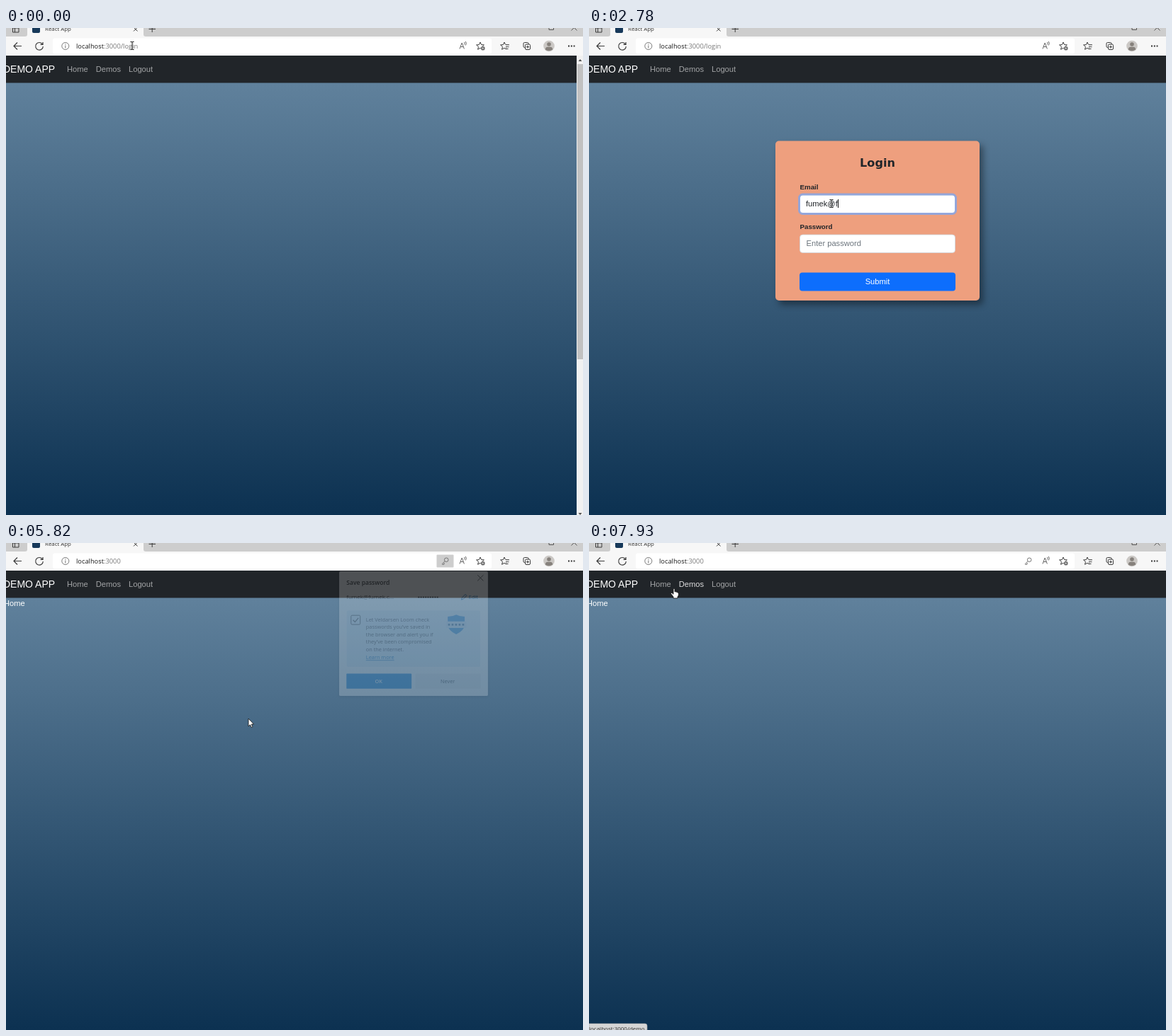
Recreate the animation shown at these times as an HTML page. Size 814 by 688 pixels, loop 8000 ms.

```html
<!DOCTYPE html>
<html lang="en">
<head>
<meta charset="utf-8">
<title>Login demo</title>
<style>
html, body { margin: 0; width: 100%; height: 100%; overflow: hidden; }
svg { display: block; width: 814px; height: 688px; }
text { font: 11.15px "Liberation Sans", Arial, sans-serif; }
.ui text { font: 7.7px "Open Sans", "Noto Sans", sans-serif; fill: #333; }
.ui .url { font-size: 9.3px; fill: #767676; }
.ui .bold { font-size: 8.95px; font-weight: 600; fill: #1b1b1b; }
.url .host { fill: #1a1a1a; }
.mid { text-anchor: middle; }
.icon { fill: none; stroke: #3b3b3b; stroke-width: 1; }
.link { fill: rgba(255, 255, 255, .58); }
.white { fill: #fff; }
.title { font: bold 16.1px "DejaVu Sans", sans-serif; fill: #212529; }
.label { font-weight: bold; font-size: 9.75px; fill: #212529; }
.hint { fill: #6c757d; }
.typed { fill: #212529; }
.field { fill: #fff; stroke: #ced4da; stroke-width: .8; }
.ring { fill: none; stroke: #86a5e6; stroke-width: 3; stroke-opacity: .85; }
.card { filter: drop-shadow(5px 6px 5px rgba(0, 0, 0, .4)); }
.popup-box { filter: drop-shadow(0 1px 2px rgba(0, 0, 0, .3)); }

#pointer, #popup, .ring { animation: 8s linear infinite; }
#pointer { animation-name: move; }
#popup { animation-name: popup; transform-origin: 493px 62px; }
#emailRing { animation-name: email-focus; }
#passRing { animation-name: pass-focus; }

@keyframes move {
  0%, .875% { transform: translate(178px, 25px); }
  3.375% { transform: translate(186px, 31px); }
  6.625% { transform: translate(206px, 58px); }
  9.125% { transform: translate(238.5px, 102px); }
  9.875% { transform: translate(272px, 150px); }
  10.75% { transform: translate(314px, 211px); }
  11.5% { transform: translate(326px, 228px); }
  13.125% { transform: translate(338px, 243px); }
  14.875%, 80.25% { transform: translate(342px, 248px); }
  83.5% { transform: translate(450px, 235px); }
  86% { transform: translate(600px, 202px); }
  86.875%, 88.5% { transform: translate(617.5px, 197px); }
  89.25% { transform: translate(560px, 180px); }
  90.875% { transform: translate(411px, 140px); }
  93.375% { transform: translate(260px, 95px); }
  95.875% { transform: translate(165px, 72px); }
  98.25% { transform: translate(124px, 65px); }
  99.125%, 100% { transform: translate(120px, 64px); }
}
@keyframes popup {
  0%, 71.875% { opacity: 0; transform: scale(.945); }
  72.75% { opacity: .2; transform: scale(.957); }
  75.25%, 87.625% { opacity: 1; transform: scale(.978); }
  88.5% { opacity: .47; transform: scale(1); }
  90%, 100% { opacity: 0; transform: scale(1); }
}
@keyframes email-focus {
  0%, 16.5% { opacity: 0; }
  18.375%, 44.625% { opacity: 1; }
  46.5%, 100% { opacity: 0; }
}
@keyframes pass-focus {
  0%, 44.625% { opacity: 0; }
  46.5%, 100% { opacity: 1; }
}
</style>
</head>
<body>
<svg viewBox="0 0 814 688">
  <defs>
    <linearGradient id="sky" x2="0" y2="1">
      <stop stop-color="#60819c"/><stop offset="1" stop-color="#0c3151"/>
    </linearGradient>
    <path id="star" d="M0-5.5 1.6-1.9 5.4-1.6 2.5 1 3.4 4.8 0 2.8-3.4 4.8-2.5 1-5.4-1.6-1.6-1.9Z"/>
  </defs>

  <!-- page -->
  <rect y="77" width="814" height="611" fill="url(#sky)"/>
  <rect y="39" width="814" height="38.5" fill="#212529"/>
  <text class="white" x="-4" y="63" style="font-size:14px">DEMO APP</text>
  <text class="link" x="86" y="62">Home</text>
  <text class="link" x="126.7" y="62" data-on="0-7800">Demos</text>
  <text x="126.7" y="62" fill="#dcdcdd" data-on="7800-8000">Demos</text>
  <text class="link" x="173" y="62">Logout</text>

  <!-- scrollbar -->
  <g data-on="0-70">
    <rect x="805" y="39" width="9" height="649" fill="#f1f1f1"/>
    <rect x="806" y="51" width="8" height="417" fill="#c1c1c1"/>
    <path d="M807.5 47l2.5-3 2.5 3zM807.5 685l2.5 3 2.5-3z" fill="#505050"/>
  </g>

  <!-- login form -->
  <g data-on="70-5550">
    <rect class="card" x="263" y="159.500" width="288" height="225.500" rx="5" fill="#ee9f7e"/>
    <text class="title mid" x="407" y="196">Login</text>
    <text class="label" x="297.500" y="228">Email</text>
    <rect class="field" x="297.500" y="236" width="219" height="25.500" rx="4"/>
    <rect class="ring" id="emailRing" x="296.500" y="235" width="221" height="27.500" rx="5"/>
    <text class="hint" x="306.500" y="252" data-on="0-1990">Enter email</text>
    <text class="typed" id="email" x="306" y="252"></text>
    <text class="label" x="297.500" y="284.300">Password</text>
    <rect class="field" x="297.500" y="292" width="219" height="25.500" rx="4"/>
    <rect class="ring" id="passRing" x="296.500" y="291" width="221" height="27.500" rx="5"/>
    <text class="hint" x="306.500" y="308" data-on="0-3770">Enter password</text>
    <text class="typed" id="pass" x="306" y="308"></text>
    <g class="icon" stroke-width="1.2" data-on="3770-5550">
      <path d="M491.800 307.500C493 303 496 301 498.800 301S504.500 303 505.700 307.500" stroke="#222"/>
      <circle cx="498.800" cy="307" r="2.800" stroke="#222"/>
    </g>
    <rect id="caret" width="1" height="12" fill="#111"/>
    <rect x="297" y="345.500" width="220" height="26" rx="4" fill="#0d6efd"/>
    <text class="white mid" x="407" y="362">Submit</text>
  </g>

  <text class="white" x="-3" y="89" data-on="5550-8000">Home</text>

  <!-- browser frame -->
  <g class="ui">
    <rect width="814" height="13" fill="#cdcdcd"/>
    <path d="M0 12H27Q30 12 30 9V0H194V9Q194 12 197 12H814V39H0Z" fill="#f7f7f7"/>
    <rect x="66" y="14.500" width="619" height="22" rx="3" fill="#fff"/>
    <rect x="37" y="-4" width="11" height="11" rx="2" fill="#17395a"/>
    <text x="55" y="4.300" style="font-size:7.9px">React App</text>
    <g class="icon">
      <path d="M9.500-2V6H18V-2M12.500-2V6M9.500 0H18" />
      <path d="M180-1l5.500 5.500M185.500-1L180 4.500M201.500 1.500h9.500M206.200-3V6"/>
      <path d="M766-1V2.500h6.500V-1M797.500 3.500l4-4 4 4" stroke="#555"/>
      <path d="M22 25.500H11M16 20.500l-5 5 5 5" stroke-width="1.200"/>
      <path d="M51.500 23A5.300 5.300 0 1 0 52.300 26M52 20v3.400h-3.400" stroke-width="1.200"/>
      <g stroke="#777">
        <circle cx="83.800" cy="25.500" r="5"/><path d="M83.800 24.500v4M83.800 22.300v1.200"/>
      </g>
    </g>
    <text class="url" x="99" y="29" data-on="0-5550"><tspan class="host">localhost</tspan>:3000/login</text>
    <text class="url" x="99" y="29" data-on="5550-8000"><tspan class="host">localhost</tspan>:3000</text>

    <rect x="607.500" y="16.500" width="24" height="18" rx="1" fill="#cdcdcd" data-on="5690-7270"/>
    <g class="icon" stroke="#666">
      <g data-on="3770-8000" stroke="#777">
        <circle cx="621.200" cy="23.800" r="2.800"/><path d="M619 25.800L615.500 29.300V30.300H617.800V28.800H619"/>
      </g>
      <path d="M640 29.500l3.200-8.500 3.200 8.500M641.200 26.500h4M646.500 20q1.500 1.500 0 3.500M648.300 19q2.200 2.500 0 5.500" stroke="#666"/>
      <use href="#star" x="669" y="25.500"/>
      <circle cx="672.800" cy="28.700" r="3" fill="#555" stroke="#fff" stroke-width=".5"/>
      <path d="M671.200 28.700h3.200M672.800 27.100v3.200" stroke="#fff" stroke-width=".7"/>
      <use href="#star" x="703" y="25.500"/>
      <path d="M704 25h6M705.500 27.700h4.500M705.500 30.300h3.500" stroke="#f7f7f7" stroke-width="3"/>
      <path d="M705 23.800h5M705 26.700h4.500M705 29.500h3.500"/>
      <rect x="730" y="20.500" width="7" height="7" rx="1.500"/>
      <rect x="732.500" y="23" width="7" height="7.500" rx="1.500" fill="#f7f7f7"/>
      <path d="M734 26.700h4M736 24.700v4"/>
    </g>
    <circle cx="766" cy="25.500" r="7.800" fill="#cbc8c5"/>
    <circle cx="766" cy="23" r="2.800" fill="#86817c"/>
    <path d="M760.800 30.500Q761 26.800 764 26.800h4Q771 26.800 771.200 30.500Q766 34 760.800 30.500Z" fill="#86817c"/>
    <path d="M793 25.500h9.500" stroke="#333" stroke-width="2" stroke-dasharray="2 1.800"/>

    <g data-on="7800-8000">
      <path d="M0 679H79Q82 679 82 682V688H0Z" fill="#d6d6d6" stroke="#aaa" stroke-width=".6"/>
      <text x="0" y="688.500" style="font-size:8px">localhost:3000/demo</text>
    </g>

    <!-- password prompt -->
    <g id="popup">
      <rect class="popup-box" x="469" y="39" width="219.300" height="184" rx="2" fill="#fff"/>
      <text class="bold" x="479.700" y="59">Save password</text>
      <path class="icon" d="M673 44.500l8.500 8.500M681.500 44.500L673 53"/>
      <text x="479.700" y="80" style="font-size:8.35px">fumek@fumek.c...</text>
      <path d="M585.300 77.300h30" stroke="#222" stroke-width="2" stroke-dasharray="2 1.450"/>
      <path class="icon" d="M649 81l1-3 5-5 2 2-5 5Z" style="stroke:#0067b8"/>
      <text x="660" y="80" style="fill:#0067b8">Edit</text>
      <rect x="480" y="97" width="197" height="83" rx="2" fill="#e3eefa"/>
      <rect class="icon" x="486.500" y="104" width="13.500" height="13.500" rx="1.500"/>
      <path class="icon" d="M489.500 110.800l2.800 3 5-6" style="stroke-width:1.300"/>
      <text x="508.500" y="113">Let Veldarsen Loom check</text>
      <text x="508.500" y="124">passwords you’ve saved in</text>
      <text x="508.500" y="135">the browser and alert you if</text>
      <text x="508.500" y="146">they’ve been compromised</text>
      <text x="508.500" y="157">on the internet.</text>
      <text x="508.500" y="169" style="fill:#0067b8;text-decoration:underline">Learn more</text>
      <path d="M629 106Q636 106 641.500 103Q647 106 654 106V118Q653 127 641.500 132Q630 127 629 118Z" fill="#2b88d8"/>
      <rect x="626.500" y="113" width="30" height="9.500" rx="1" fill="#d3e5f6"/>
      <path d="M629.500 117.800h24" stroke="#33618c" stroke-width="2.800" stroke-dasharray="2.800 2.400"/>
      <rect x="479.700" y="190" width="96" height="22.300" rx="1" fill="#0078d4"/>
      <text class="mid" x="527.300" y="204" style="fill:#fff;font-weight:600">OK</text>
      <rect x="581.500" y="190" width="96" height="22.300" rx="1" fill="#f0f0f0"/>
      <rect x="581.500" y="190" width="96" height="22.300" rx="1" fill="#e8e8e8" data-on="6860-7270"/>
      <text class="mid" x="629" y="204">Never</text>
    </g>
  </g>

  <g id="pointer">
    <g data-on="0-270 1000-5550" fill="none">
      <path d="M-2.500-5.500H-.8L0-5 .8-5.500H2.500M0-5V5M-2.500 5.500H-.8L0 5 .8 5.500H2.500" stroke="#fff" stroke-opacity=".6" stroke-width="2"/>
      <path d="M-2.500-5.500H-.8L0-5 .8-5.500H2.500M0-5V5M-2.500 5.500H-.8L0 5 .8 5.500H2.500" stroke="#111"/>
    </g>
    <path data-on="270-1000 5550-7800" d="M0 0V11L2.500 8.700 4.100 12.500 5.900 11.700 4.300 8H7.600Z" fill="#fff" stroke="#111" stroke-width=".8"/>
    <path data-on="7800-8000" d="M-1 1Q0-1 1 1V5Q2.200 4 3 5.300Q4.400 4.700 4.800 6Q6.300 5.500 6.300 7.500V10L5 12V14H-1V12L-4.500 7.500Q-4.500 6-3 6.500L-1 8.300Z" fill="#fff" stroke="#111" stroke-width=".8"/>
  </g>
</svg>
<script>
const $ = id => document.getElementById(id);
const LOOP = 8000;
const clock = $("pointer").getAnimations()[0];

// Each field: when it takes focus, its text and the time of every key.
const fields = [
  { el: $("email"), focus: 1320, text: "fumek@fumek.com", caretY: 242,
    keys: [1990, 2070, 2150, 2230, 2310, 2510, 2640, 2780, 2780, 2910, 2970, 3170, 3310, 3370, 3440] },
  { el: $("pass"), focus: 3570, text: "•".repeat(9), caretY: 299,
    keys: [3770, 3840, 3900, 3970, 4100, 4160, 4830, 5160, 5290] }
];

const timed = [...document.querySelectorAll("[data-on]")].map(el => ({
  el, spans: el.dataset.on.split(" ").map(s => s.split("-").map(Number))
}));

function draw() {
  const t = (clock.currentTime || 0) % LOOP;

  for (const { el, spans } of timed)
    el.style.display = spans.some(([a, b]) => t >= a && t < b) ? "" : "none";

  const caret = $("caret");
  caret.style.display = "none";
  for (const { el, focus, text, keys, caretY } of fields) {
    const count = keys.filter(k => k <= t).length;
    el.textContent = text.slice(0, count);
    if (t < focus) continue;
    const idle = t - (count ? keys[count - 1] : focus);
    caret.style.display = idle % 1060 < 530 ? "" : "none";
    caret.setAttribute("x", Math.round(306 + (count && el.getComputedTextLength())));
    caret.setAttribute("y", caretY);
  }
  requestAnimationFrame(draw);
}
draw();
</script>
</body>
</html>
```
